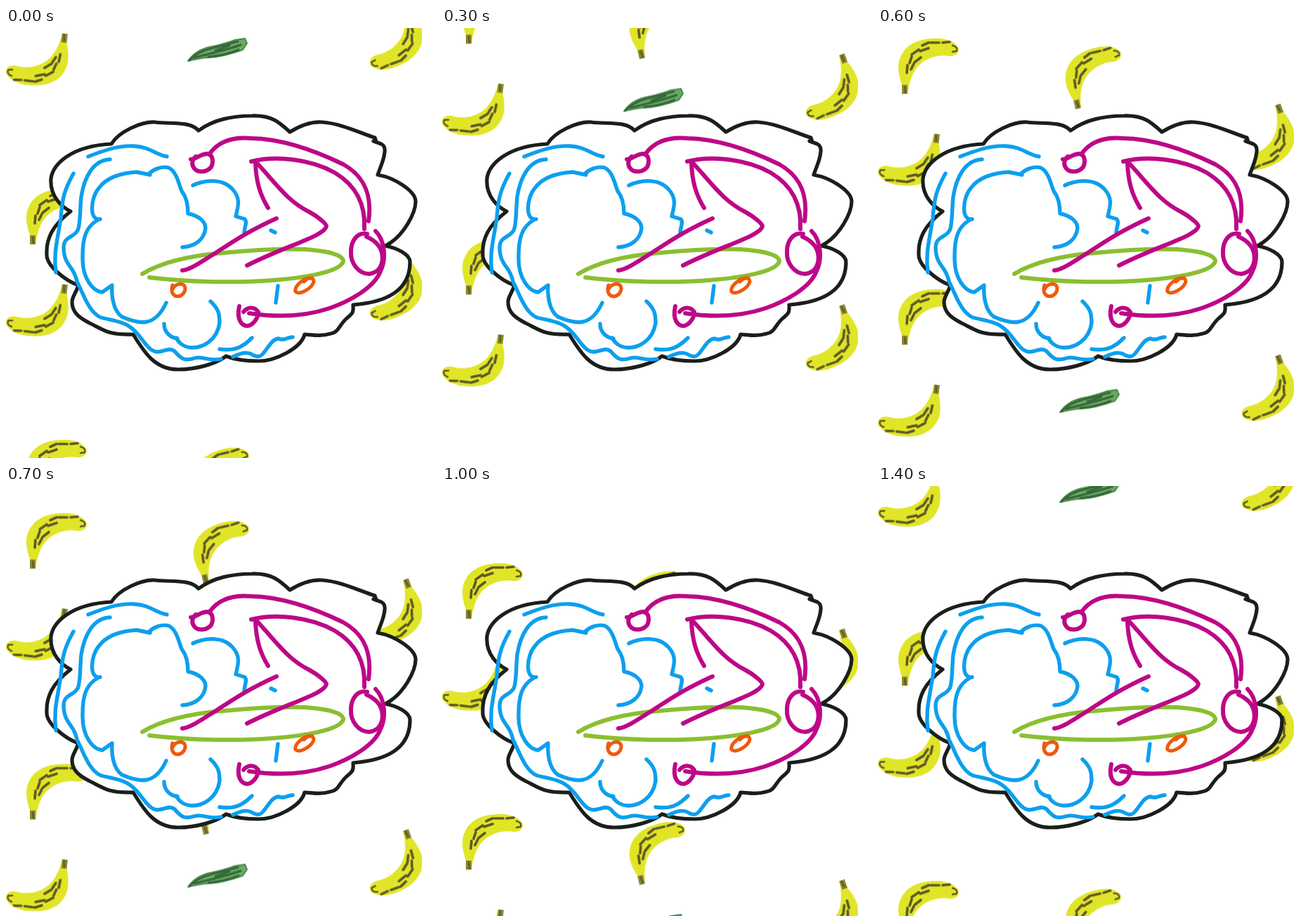
These frames come from a looping animation (612x612 px, 1.5 s). An HTML page:

```html
<!DOCTYPE html>
<html lang="en">
<head>
<meta charset="utf-8">
<title>Falling fruit</title>
<style>
  html, body { margin: 0; width: 100%; height: 100%; overflow: hidden; background: #fff; }
  svg { display: block; }
  path { fill: none; stroke-linecap: round; stroke-linejoin: round; }
  #fall { animation: fall 1.5s steps(15) infinite; }
  @keyframes fall { to { transform: translateY(357px); } }
  .cloud path { fill: #fff; stroke: #1a1f1b; stroke-width: 5.2; }
  .blue path { stroke: #0d9fee; stroke-width: 5.4; }
  .green path { stroke: #8abf30; stroke-width: 6; }
  .pink path { stroke: #bd0787; stroke-width: 6; }
  .orange path { stroke: #ee5a0c; stroke-width: 5; }
</style>
</head>
<body>
<svg width="612" height="612" viewBox="0 0 612 612">
  <defs>
    <!-- origin at the end of the stem -->
    <g id="banana">
      <path style="fill:#e1e527" d="M-4 0V-13C-10-30-12-45-2-60C8-74 25-79 46-79C62-79 75-72 77-64C77-56 70-53 62-54C40-57 23-46 15-34C9-25 6-14 4 0Z"/>
      <path style="stroke-linecap:butt" stroke="#8b8831" stroke-width="8" d="M0 0V-13"/>
      <path stroke="#5f5a25" stroke-width="3.7" d="M25-69l9-4M37-73h12M54-73l10-1M22-61l12-4M10-56l10-7M7-44l3-9M14-45l9-7M3-30l1-11M9-35l4-8"/>
      <path stroke="#5f5a25" stroke-width="2.4" d="M68-69Q76-67 74-61L68-60M1-2L0-10"/>
    </g>
    <g id="cucumber">
      <path style="fill:#69a860" stroke="#4c8a4c" stroke-width="2" d="M259 47C266 37 276 30 290 27C306 24 314 21 326 17L340 15L343 22L337 31C320 37 305 41 290 42C278 42 268 45 259 47Z"/>
      <path stroke="#35683a" stroke-width="3" d="M261 46Q272 34 292 29T330 19M268 42Q290 37 308 32T334 24M288 41Q312 39 331 31M298 32L318 25"/>
    </g>
    <g id="set">
      <use href="#banana" transform="translate(84 8) rotate(187)"/>
      <use href="#banana" transform="translate(569 -34) rotate(160)"/>
      <use href="#banana" transform="translate(38 308)"/>
      <use href="#banana" transform="translate(285 329) rotate(-13)"/>
      <use href="#cucumber"/>
    </g>
  </defs>

  <svg width="592" height="612">
    <g id="fall">
      <use href="#set" y="-357"/>
      <use href="#set"/>
      <use href="#set" y="357"/>
    </g>
  </svg>

  <g class="cloud">
    <path d="M523 161L534 165Q540 168 539 176C538 188 535 192 529 209
      C553 213 583 232 583 247C583 262 567 296 540 310
      C556 313 575 322 575 333C575 372 545 390 494 394
      C495 408 492 406 483 415C474 424 472 434 462 435C448 439 438 437 425 436
      C420 456 383 474 360 474C345 474 328 473 313 467
      C300 478 270 486 245 486C212 486 197 462 181 436
      C150 437 142 432 125 423C104 413 94 405 94 390C94 382 100 377 103 366
      C85 360 57 338 58 322C57 300 66 281 92 261
      C80 255 62 240 64 214C67 194 92 168 150 165
      C160 148 192 133 212 134C235 137 262 132 274 146
      C293 132 318 125 350 125C378 124 389 134 404 148
      C420 138 436 133 450 134C478 136 505 150 525 156L527 162"/>
  </g>

  <g class="blue">
    <path d="M117 183C140 174 160 167 182 168C205 169 212 180 229 183"/>
    <path d="M96 207C82 232 80 245 78 270C74 300 67 318 71 348"/>
    <path d="M148 187C125 188 112 210 107 240C105 262 106 280 102 288C96 299 82 296 82 313
      C83 340 97 338 101 361C110 378 118 405 135 412C155 417 170 418 182 430
      C195 442 202 460 215 461C225 461 232 454 240 460C250 472 255 474 268 470C278 466 290 475 306 471"/>
    <path d="M134 272C118 275 120 242 132 228C145 210 170 206 186 205L205 209"/>
    <path d="M204 207C210 201 222 196 232 199C243 205 246 222 250 232C258 242 259 254 259 264
      C278 268 284 278 284 285C282 302 268 311 251 312"/>
    <path d="M131 273C113 283 109 300 109 325C108 358 125 375 137 376L151 366C150 380 152 402 165 411C190 422 212 426 228 391"/>
    <path d="M266 224C285 215 310 215 322 229C335 243 330 255 327 268L340 272C344 278 339 282 339 293"/>
    <path d="M377 288L383 291M387 367L384 391"/>
    <path d="M291 389C303 400 304 408 304 420C300 445 280 455 265 455C250 454 245 446 242 441"/>
    <path d="M225 421C225 434 235 441 244 442"/>
    <path d="M304 457C327 460 337 454 350 441"/>
    <path d="M323 468C335 462 342 461 349 464C356 468 361 470 367 462C375 452 379 443 388 442C396 446 400 440 408 440"/>
  </g>

  <g class="green">
    <path d="M194 350C220 334 260 324 310 320C350 316 390 314 425 315C455 317 480 322 480 332C476 348 420 356 380 359C330 363 260 362 204 355"/>
  </g>

  <g class="pink">
    <path d="M263 187C272 186 277 179 287 179C294 180 296 190 292 198C286 205 274 207 268 200C264 195 264 188 270 183"/>
    <path d="M289 180C305 157 330 155 350 157C395 158 445 177 480 194C512 212 521 240 516 275"/>
    <path d="M349 190C385 181 435 187 468 206C498 224 512 250 510 286"/>
    <path d="M355 192C356 220 362 238 373 256"/>
    <path d="M356 191C385 222 400 246 432 262C445 269 456 279 456 282C454 296 398 310 343 338"/>
    <path d="M385 271C345 289 325 303 300 319C278 333 262 344 251 345"/>
    <path d="M514 293C500 290 491 303 491 318C490 335 502 350 517 350C532 348 538 335 535 320C532 307 522 301 513 297"/>
    <path d="M526 289C540 303 541 330 533 346C525 368 492 388 460 399C424 411 385 412 346 406"/>
    <path d="M332 396C328 415 335 424 344 424C352 423 360 411 359 404C354 397 345 396 338 404"/>
  </g>

  <g class="orange">
    <path d="M237 366C234 376 238 382 245 382C253 381 257 372 254 367C250 362 241 364 237 372"/>
    <path d="M436 356C424 354 410 368 412 375C418 381 436 370 438 361C438 354 430 355 424 361"/>
  </g>
</svg>
</body>
</html>
```
